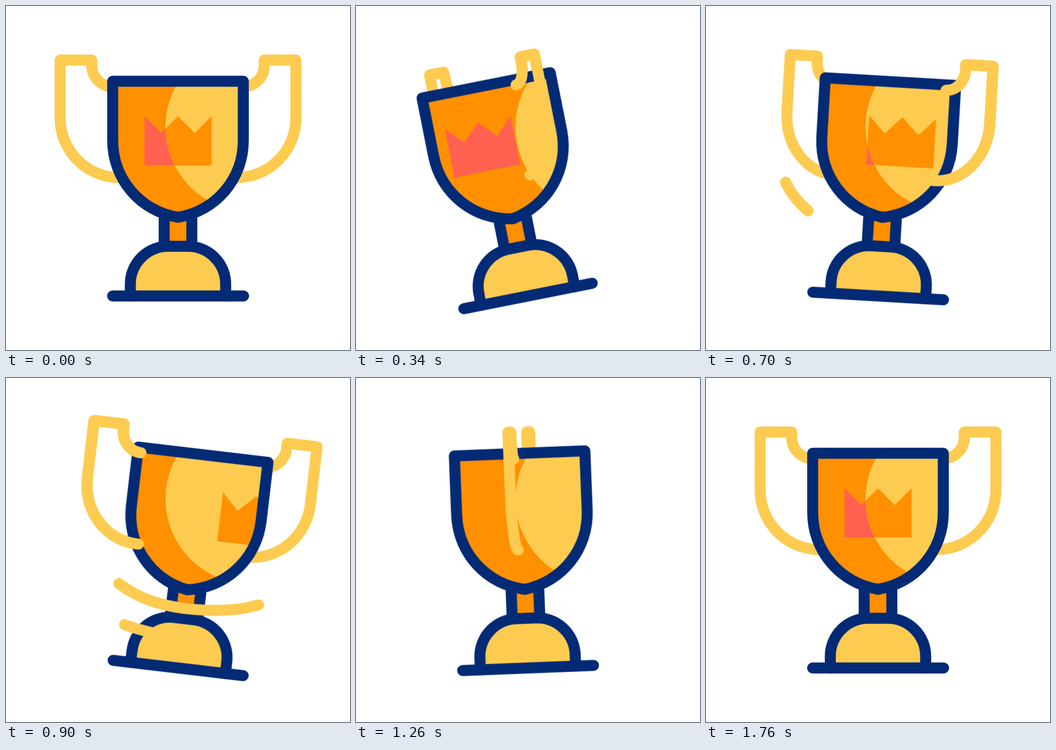
These frames come from a looping animation (640 px wide and 640 px high, 2.4 s). An HTML page without scripts:

```html
<!DOCTYPE html>
<html lang="en">
<head>
<meta charset="utf-8">
<title>Trophy</title>
<style>
  html, body { margin: 0; width: 100%; height: 100%; overflow: hidden; background: #fff; }
  svg { display: block; width: 100%; height: 100%; }

  :root { --navy: #032a75; --gold: #fdcb50; --orange: #ff9000; --pink: #ff6151; --ease: cubic-bezier(.333, 0, .667, 1); }

  .navy { fill: none; stroke: var(--navy); stroke-width: 20.5; stroke-linecap: round; stroke-linejoin: round; }
  .gold { fill: none; stroke: var(--gold); stroke-width: 20.5; stroke-linecap: round; stroke-linejoin: round; }

  .swing, .spin, .crown, .front, .trail {
    animation-duration: 2400ms;
    animation-iteration-count: infinite;
    animation-timing-function: var(--ease);
  }
  .swing { transform-origin: 320px 540px; animation-name: swing; }
  .spin { transform-origin: 320px 0; animation-name: spin; }
  .crown { animation-name: slide; }
  .front { animation-timing-function: step-end; }
  .front.left { animation-name: left-front; }
  .front.right { animation-name: right-front; }
  .trail { animation-timing-function: linear; }
  .trail.upper { animation-name: upper; }
  .trail.lower { animation-name: lower; }

  /* damped tilt around the foot */
  @keyframes swing {
    0%, 1.667% { transform: rotate(0deg); }
    16.667% { transform: rotate(-12.1deg); }
    35% { transform: rotate(8.1deg); }
    47.2% { transform: rotate(-4.2deg); }
    60% { transform: rotate(1deg); }
    71.5%, 100% { transform: rotate(0deg); }
  }

  /* handles turn around the vertical axis */
  @keyframes spin {
    0%, .833% { transform: scaleX(1); }
    16.667% { transform: scaleX(.415); }
    35% { transform: scaleX(1); animation-timing-function: cubic-bezier(.364, .08, .673, .54); }
    53.75% { transform: scaleX(.001); animation-timing-function: cubic-bezier(.327, .5, .636, 1); }
    73.333%, 100% { transform: scaleX(1); }
  }

  /* crown leaves on the right and comes back from the left */
  @keyframes slide {
    0%, .833% { transform: translateX(0); }
    16.667% { transform: translateX(-31px); animation-timing-function: cubic-bezier(.4, .03, .7, .65); }
    45% { transform: translateX(182px); animation-timing-function: step-end; }
    54% { transform: translateX(-182px); animation-timing-function: step-end; }
    60.8% { transform: translateX(-182px); animation-timing-function: cubic-bezier(.327, .511, .636, 1); }
    73.333%, 100% { transform: translateX(0); }
  }

  @keyframes left-front {
    0% { visibility: hidden; }
    35% { visibility: visible; }
    53.75%, 100% { visibility: hidden; }
  }
  @keyframes right-front {
    0% { visibility: hidden; }
    .6% { visibility: visible; }
    35% { visibility: hidden; }
    53.75% { visibility: visible; }
    73%, 100% { visibility: hidden; }
  }

  @keyframes upper {
    0%, 26.6% { visibility: hidden; stroke-dasharray: 0 200; stroke-dashoffset: 0; }
    26.667% { visibility: visible; stroke-dasharray: 0 200; stroke-dashoffset: 0; }
    29.167% { visibility: visible; stroke-dasharray: 15.5 200; stroke-dashoffset: 0; }
    33.333% { visibility: visible; stroke-dasharray: 50 200; stroke-dashoffset: 0; }
    40% { visibility: visible; stroke-dasharray: 70 200; stroke-dashoffset: -30; }
    45.833% { visibility: visible; stroke-dasharray: 32 200; stroke-dashoffset: -68; }
    50.833% { visibility: visible; stroke-dasharray: 0 200; stroke-dashoffset: -100; }
    50.9%, 100% { visibility: hidden; stroke-dasharray: 0 200; stroke-dashoffset: -100; }
  }
  @keyframes lower {
    0%, 33.3% { visibility: hidden; stroke-dasharray: 0 200; stroke-dashoffset: 0; }
    33.333% { visibility: visible; stroke-dasharray: 0 200; stroke-dashoffset: 0; }
    37.5% { visibility: visible; stroke-dasharray: 50 200; stroke-dashoffset: 0; }
    41.667% { visibility: visible; stroke-dasharray: 70 200; stroke-dashoffset: -30; }
    45.833% { visibility: visible; stroke-dasharray: 40 200; stroke-dashoffset: -60; }
    50.833% { visibility: visible; stroke-dasharray: 0 200; stroke-dashoffset: -100; }
    50.9%, 100% { visibility: hidden; stroke-dasharray: 0 200; stroke-dashoffset: -100; }
  }
</style>
</head>
<body>
<svg viewBox="0 0 640 640">
  <defs>
    <path id="cup" d="M198.5 140H441.5V250C441.5 322 390 382 320 393C250 382 198.5 322 198.5 250Z"/>
    <path id="crown" d="M257.7 205L288.8 236.5L320 205L351.2 236.5L382.5 205V296.7H257.7Z"/>
    <path id="arm" class="gold" vector-effect="non-scaling-stroke"
      d="M199 150A39.5 39.5 0 0 1 159.5 110.5V100.5H100.7V208A111 111 0 0 0 211.7 319.3H215"/>
    <clipPath id="bowl"><use href="#cup"/></clipPath>
    <clipPath id="shine"><circle cx="455" cy="225" r="158.3"/></clipPath>
  </defs>

  <!-- handles behind the cup -->
  <g class="swing">
    <use href="#arm" class="spin"/>
    <g transform="matrix(-1 0 0 1 640 0)"><use href="#arm" class="spin"/></g>
  </g>

  <!-- cup in shade -->
  <g class="swing">
    <rect x="294" y="385" width="52" height="62" fill="var(--orange)"/>
    <use href="#cup" fill="var(--orange)"/>
    <g clip-path="url(#bowl)"><use href="#crown" class="crown" fill="var(--pink)"/></g>
  </g>

  <!-- cup in light; the light stays still while the cup tilts -->
  <g clip-path="url(#shine)">
    <g class="swing">
      <use href="#cup" fill="var(--gold)"/>
      <g clip-path="url(#bowl)"><use href="#crown" class="crown" fill="var(--orange)"/></g>
    </g>
  </g>

  <g class="swing">
    <path class="navy" d="M294.3 395V447M345.7 395V447"/>
    <use href="#cup" class="navy"/>
    <path class="navy" style="fill:var(--gold)" d="M231.3 539.5V517.5A70.5 70.5 0 0 1 301.8 447H338.2A70.5 70.5 0 0 1 408.7 517.5V539.5"/>
    <path class="navy" d="M198.4 539.5H442"/>

    <g class="front left"><use href="#arm" class="spin"/></g>
    <g class="front right" transform="matrix(-1 0 0 1 640 0)"><use href="#arm" class="spin"/></g>

    <path class="gold trail upper" pathLength="100" d="M136 338C170 400 240 428 320 428C420 428 503 400 507 350"/>
    <path class="gold trail lower" pathLength="100" d="M211 471A190 64 0 0 0 429 471"/>
  </g>
</svg>
</body>
</html>
```
